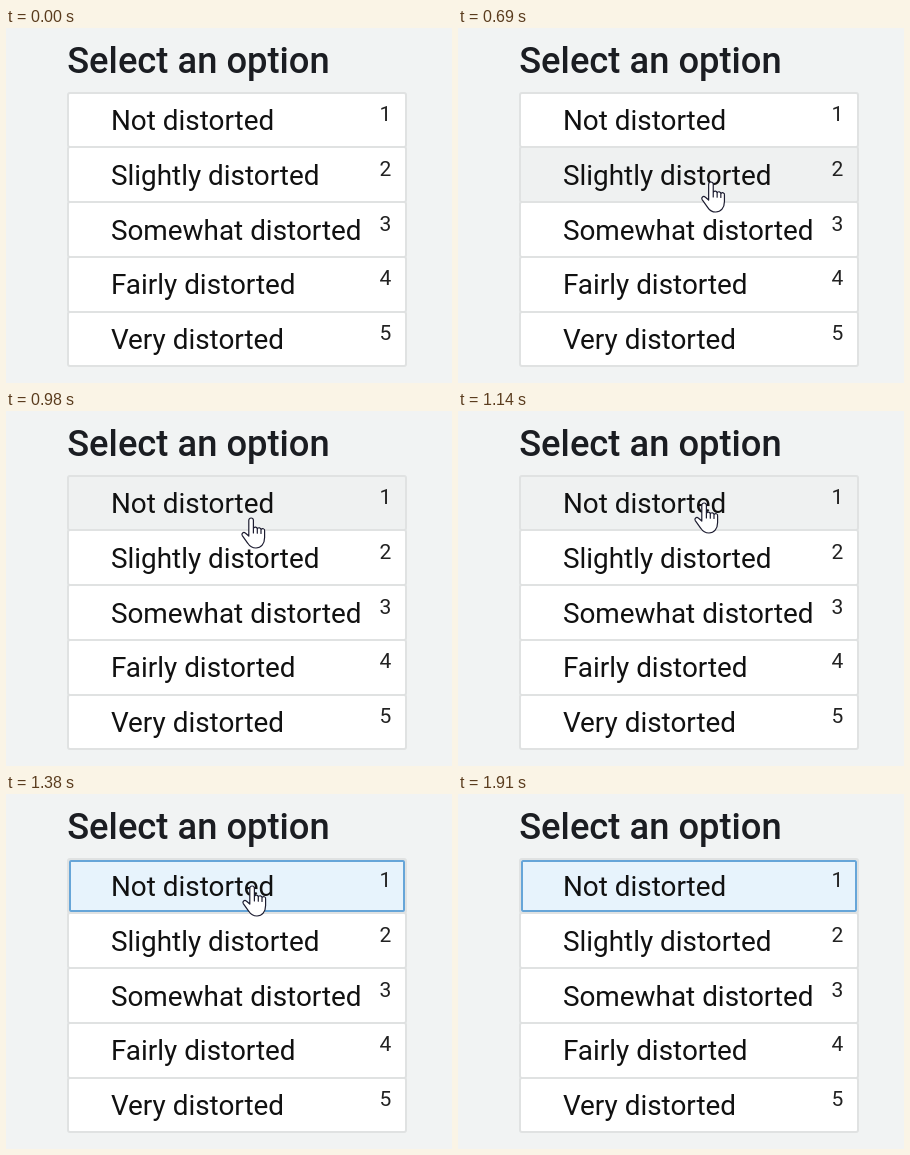
These frames come from a looping animation (446 by 355 pixels, 2.75 s). An HTML page:

```html
<!DOCTYPE html>
<html lang="en">
<head>
<meta charset="utf-8">
<title>Select an option</title>
<style>
  html, body { margin: 0; width: 100%; height: 100%; overflow: hidden; background: #f1f3f3; }
  svg { display: block; font-family: Roboto, sans-serif; }
  .title { font-size: 36.3px; font-weight: 500; fill: #1b1d22; }
  .label { font-size: 27.9px; fill: #111; }
  .key { font-size: 21px; fill: #222; text-anchor: middle; }
  .row { fill: #fff; stroke: #e0e2e2; stroke-width: 2; }
  .row.hover { fill: #eff1f1; }
  #selection { fill: #e7f3fc; stroke: #66a5d8; stroke-width: 2; }
  #hand path { fill: #fff; stroke: #1c1c30; stroke-width: 1.2; stroke-linejoin: round; stroke-linecap: round; }
</style>
</head>
<body>
<svg width="446" height="355" viewBox="0 0 446 355">
  <text class="title" x="61.2" y="45">Select an option</text>
  <g id="rows"></g>
  <rect id="selection" x="64" y="67" width="334" height="50" rx="1"/>
  <g id="labels"></g>
  <g id="hand">
    <path d="M7.8 19V3.3a2.3 2.3 0 0 1 4.6 0V11.5a2 2 0 0 1 3.9 .6a1.9 1.9 0 0 1 3.7 .8
      a1.9 1.9 0 0 1 3.6 1.2V20.5C23.6 27 20 31 15 31C11 31 8.5 29 6.8 26.3L1.3 18.6
      a2 2 0 0 1 3-2.6L7.8 19M12.4 11.5V16M16.3 12.1V16.2M20 12.9V16.5"/>
  </g>
</svg>
<script>
const LOOP = 2750;
const PITCH = 54.75;
const SELECT_AT = 1290;
const HIDE_AT = 1910;
const options = ["Not", "Slightly", "Somewhat", "Fairly", "Very"];

// The pointer follows each curve in discrete steps, then rests at its end
const legs = [
  { start: 460, end: 980, steps: 7, from: [253, 280], bend: [239, 86], to: [235, 106] },
  { start: 980, end: 1140, steps: 2, from: [235, 106], bend: [233, 78], to: [236, 91] },
  { start: 1670, end: 1830, steps: 2, from: [242, 114], bend: [253, 170], to: [295, 290] }
];

const byId = id => document.getElementById(id);
const hand = byId("hand");
const selection = byId("selection");

function add(parent, tag, attributes, text = "") {
  const node = document.createElementNS("http://www.w3.org/2000/svg", tag);
  for (const name in attributes) node.setAttribute(name, attributes[name]);
  node.textContent = text;
  return byId(parent).appendChild(node);
}

const rowTop = i => Math.round(64.6 + PITCH * i);

const rows = options.map((option, i) => {
  const y = rowTop(i);
  const shift = PITCH * i;
  add("labels", "text", { class: "label", x: 104.9, y: 102 + shift }, `${option} distorted`);
  add("labels", "text", { class: "key", x: 379.5, y: 93 + shift }, i + 1);
  return add("rows", "rect", { class: "row", x: 62, y, width: 338, height: rowTop(i + 1) - y, rx: 2 });
});

function pointerAt(time) {
  const leg = legs.filter(({ start }) => start <= time).pop();
  if (!leg || time >= HIDE_AT) return null;
  const { start, end, steps, from, bend, to } = leg;
  const progress = Math.min(1, (time - start) / (end - start));
  const u = Math.floor(progress * steps) / steps;
  const v = 1 - u;
  return from.map((p, axis) => v * v * p + 2 * u * v * bend[axis] + u * u * to[axis]);
}

function draw(time) {
  const pointer = pointerAt(time);
  const hovered = pointer ? Math.floor((pointer[1] + 5 - rowTop(0)) / PITCH) : -1;

  hand.style.display = pointer ? "" : "none";
  if (pointer) hand.setAttribute("transform", `translate(${pointer})`);
  rows.forEach((row, i) => row.classList.toggle("hover", i === hovered));
  selection.style.display = time >= SELECT_AT ? "" : "none";
}

const start = performance.now();
function tick() {
  draw((performance.now() - start) % LOOP);
  requestAnimationFrame(tick);
}
tick();
</script>
</body>
</html>
```
